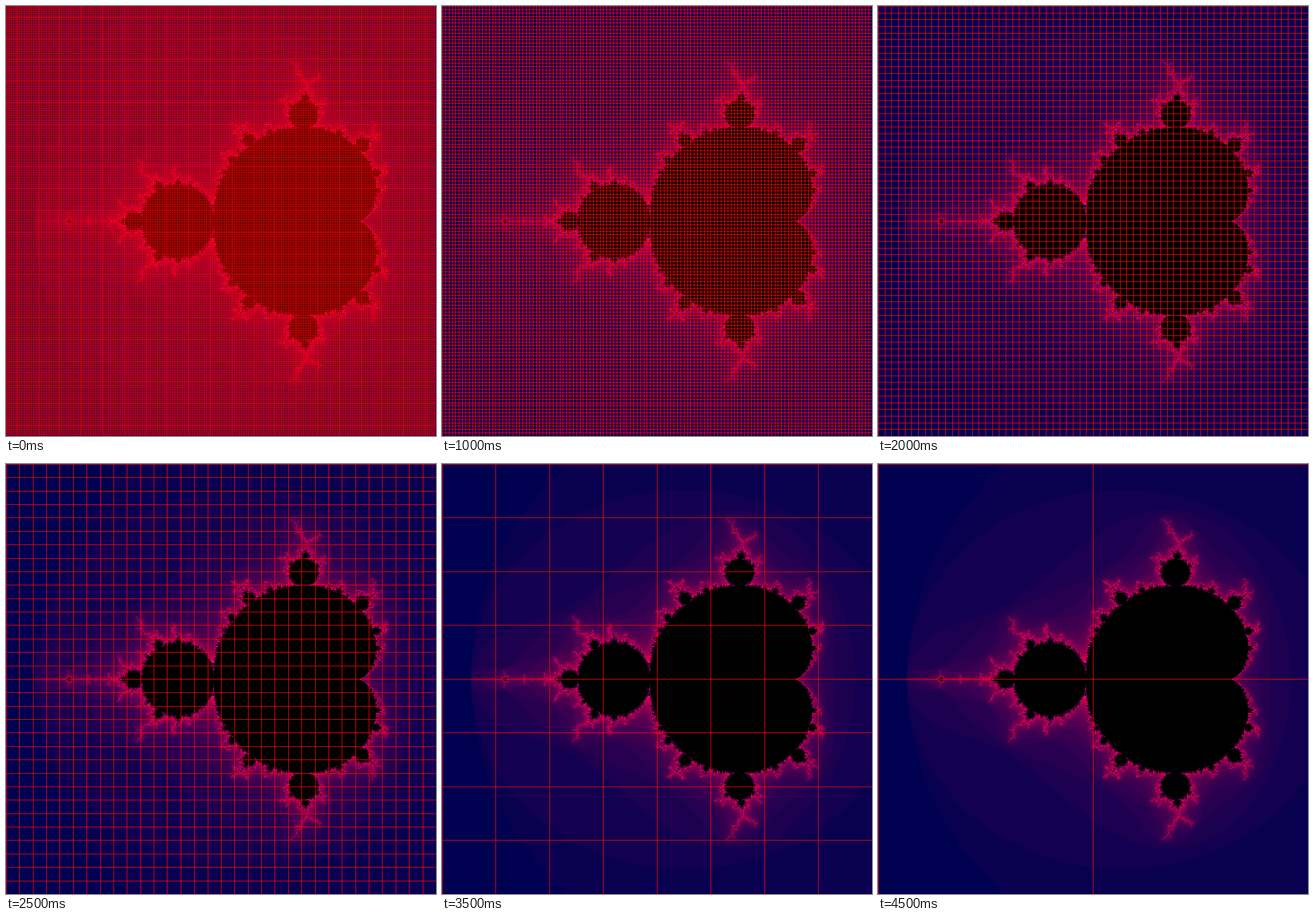
An HTML page with a canvas that plays this animation: 748x748 px, repeating every 5000 ms.

```html
<!DOCTYPE html>
<html lang="en">
<head>
<meta charset="utf-8">
<title>Mandelbrot set under a coarsening grid</title>
<style>
  html, body { margin: 0; width: 100%; height: 100%; overflow: hidden; background: #000050; }
  canvas { display: block; width: 748px; height: 748px; }
</style>
</head>
<body>
<canvas id="stage" width="748" height="748"></canvas>
<script>
const SIZE = 748;
const STEP_MS = 500;
const MAX_ITERATIONS = 100;

// Cells per side at each step; 192 and 96 are 256 and 128 with every fourth line left out.
const CELL_COUNTS = [256, 192, 128, 96, 64, 32, 16, 8, 4, 2];

const ctx = document.getElementById('stage').getContext('2d');

function escapeTime(cx, cy) {
  let x = cx, y = cy;
  for (let n = 0; n < MAX_ITERATIONS; n++) {
    if (x * x + y * y > 4) return n;
    [x, y] = [x * x - y * y + cx, 2 * x * y + cy];
  }
  return -1;
}

function renderFractal() {
  const layer = document.createElement('canvas');
  layer.width = layer.height = SIZE;
  const layerCtx = layer.getContext('2d');
  const image = layerCtx.createImageData(SIZE, SIZE);
  const scale = 3 / SIZE;
  for (let py = 0, i = 0; py < SIZE; py++) {
    for (let px = 0; px < SIZE; px++, i += 4) {
      const n = escapeTime(px * scale - 2.2, py * scale - 1.5);
      image.data[i] = n < 0 ? 0 : n * 10 % 256;
      image.data[i + 2] = n < 0 ? 0 : 80;
      image.data[i + 3] = 255;
    }
  }
  layerCtx.putImageData(image, 0, 0);
  return layer;
}

function linePositions(count) {
  const thinned = count % 3 === 0;
  const cells = thinned ? count * 4 / 3 : count;
  const positions = [];
  for (let k = 0; k < cells; k++) {
    if (thinned && k % 4 === 1) continue;
    positions.push(Math.ceil(k * SIZE / cells - 0.5));
  }
  return positions;
}

function drawStep(step) {
  ctx.drawImage(fractal, 0, 0);
  ctx.fillStyle = '#f00';
  for (const p of linePositions(CELL_COUNTS[step])) {
    ctx.fillRect(p, 0, 1, SIZE);
    ctx.fillRect(0, p, SIZE, 1);
  }
}

const fractal = renderFractal();
let shown = -1;

function tick() {
  const step = Math.floor(performance.now() / STEP_MS) % CELL_COUNTS.length;
  if (step !== shown) drawStep(shown = step);
  requestAnimationFrame(tick);
}
tick();
</script>
</body>
</html>
```
